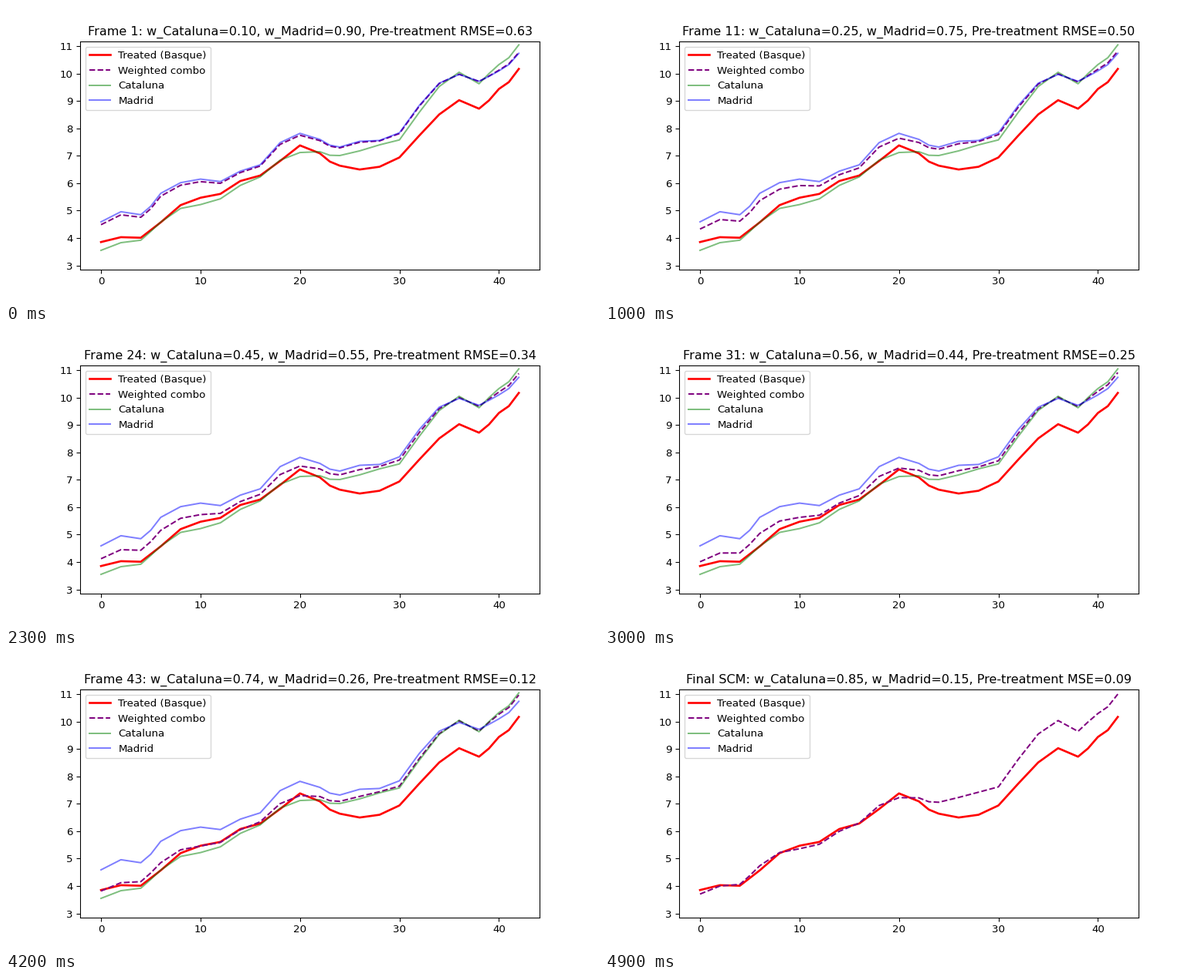
Write a matplotlib script that moves like this. It is 768x384 px and loops after 8 s.

```python
import numpy as np
import matplotlib.pyplot as plt
from matplotlib.animation import FuncAnimation

STEPS = 50          # weight steps, the last one is held
FRAMES = 80
INTERVAL = 100
PRE = 20            # years before treatment

# The curves bend at every second year and at a few odd ones.
years = np.arange(43)
bends = sorted([*range(0, 43, 2), 5, 23, 39, 41])


def curve(levels):
    """Straight segments between the levels at the bends."""
    return np.interp(years, bends, [float(v) for v in levels.split()])


basque = curve("3.853 4.03 4.01 4.29 4.57 5.20 5.47 5.61 6.08 6.28 6.81 7.38 7.09 "
               "6.79 6.64 6.50 6.60 6.94 7.74 8.51 9.03 8.72 9.02 9.44 9.69 10.171")
cataluna = curve("3.55 3.83 3.92 4.24 4.58 5.08 5.22 5.43 5.92 6.23 6.84 7.12 7.15 "
                 "7.02 7.01 7.18 7.40 7.58 8.59 9.53 10.05 9.63 10.00 10.33 10.58 11.05")
madrid = curve("4.59 4.96 4.85 5.16 5.63 6.02 6.15 6.06 6.44 6.67 7.48 7.82 7.60 "
               "7.39 7.32 7.53 7.56 7.84 8.84 9.65 9.97 9.72 9.90 10.10 10.33 10.74")
weights = np.linspace(0.10, 0.85, STEPS)

fig, ax = plt.subplots(figsize=(8, 4), dpi=96)
ax.plot(years, basque, color="red", lw=2, label="Treated (Basque)")
combo_line, = ax.plot(years, madrid, "--", color="purple", label="Weighted combo")
donor_lines = [
    ax.plot(years, cataluna, color="green", alpha=0.5, label="Cataluna")[0],
    ax.plot(years, madrid, color="blue", alpha=0.5, label="Madrid")[0],
]
ax.set_xlim(-2.1, 44.1)
ax.set_ylim(basque.min() - 1, basque.max() + 1)
ax.legend(loc="upper left")
title = ax.set_title("")


def update(frame):
    step = min(frame, STEPS - 1)
    final = step == STEPS - 1
    w = weights[step]
    combo = w * cataluna + (1 - w) * madrid
    rmse = np.sqrt(np.mean((combo - basque)[:PRE] ** 2))

    combo_line.set_ydata(combo)
    for line in donor_lines:
        line.set_visible(not final)
    head, measure = ("Final SCM", "MSE") if final else (f"Frame {step + 1}", "RMSE")
    title.set_text(f"{head}: w_Cataluna={w:.2f}, w_Madrid={1 - w:.2f}, "
                   f"Pre-treatment {measure}={rmse:.2f}")
    return [combo_line, title, *donor_lines]


anim = FuncAnimation(fig, update, frames=FRAMES, interval=INTERVAL,
                     repeat=True, repeat_delay=0)
plt.show()
```
